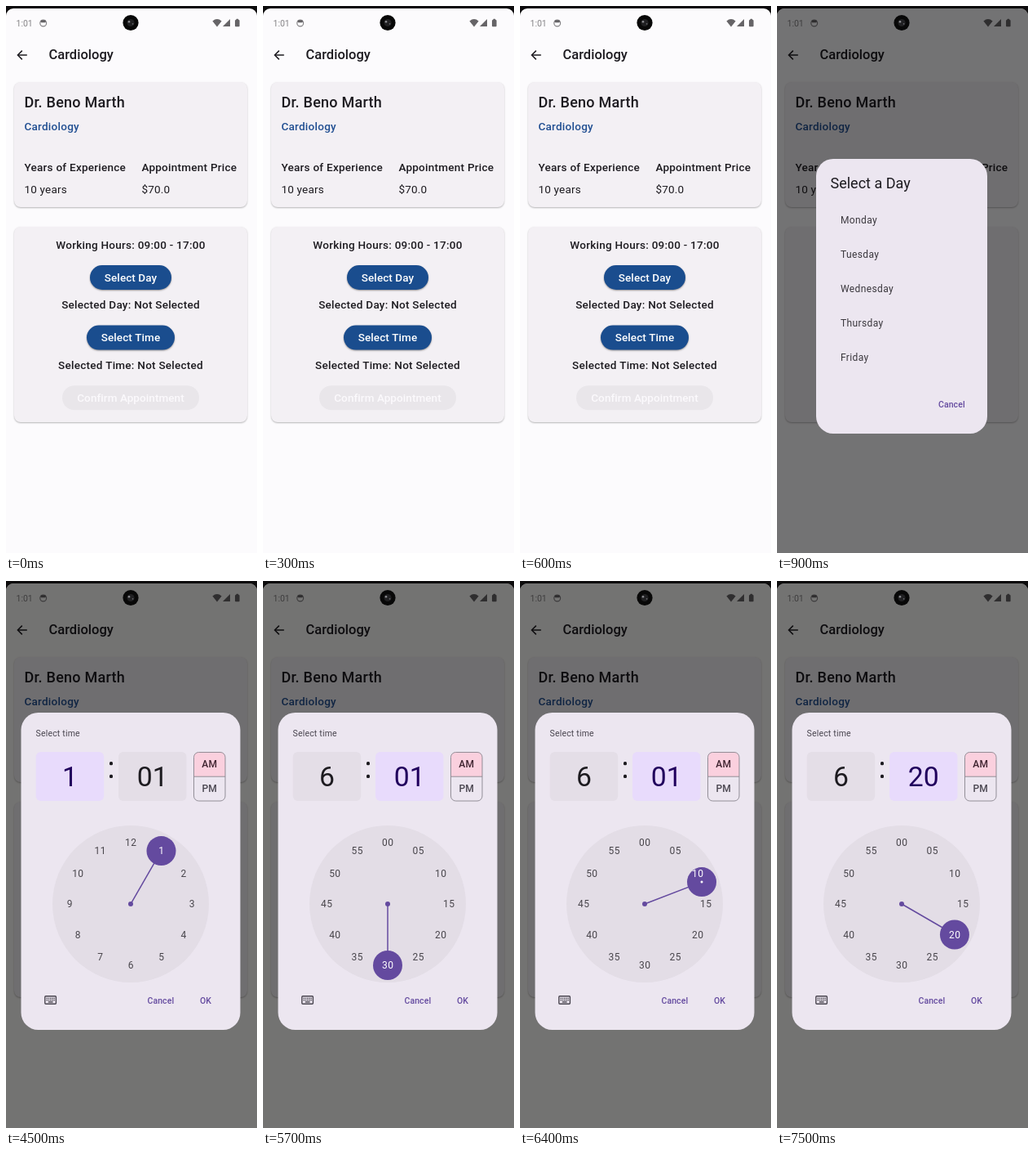
An HTML page with a canvas for the animation above (8 s loop, 308 by 669 pixels).

```html
<!DOCTYPE html>
<html lang="en">
<head>
<meta charset="utf-8">
<title>Appointment booking</title>
<style>
  html, body { margin: 0; width: 100%; height: 100%; overflow: hidden; background: #0d0c0d; }
  canvas { display: block; width: 308px; height: 669px; }
</style>
</head>
<body>
<canvas id="stage"></canvas>
<script>
const W = 308, H = 669, LOOP = 8000;
const canvas = document.getElementById('stage');
const ctx = canvas.getContext('2d');
const ratio = window.devicePixelRatio || 1;
canvas.width = W * ratio;
canvas.height = H * ratio;

const INK = '#1d1b20', SOFT = '#49454f', BLUE = '#1a4d8e', PURPLE = '#644a9f';
const DIALOG = '#ece6f0', FIELD = '#e4dee7', ACTIVE = '#e8dbfc';
const DIAL = { x: 153, y: 395, r: 96, ring: 75, knob: 18 };

function text(str, x, y, size, { color = INK, weight = 400, align = 'left', gap = 0 } = {}) {
  ctx.font = `${weight} ${size}px Roboto, sans-serif`;
  ctx.letterSpacing = gap + 'px';
  ctx.textAlign = align;
  ctx.fillStyle = color;
  ctx.fillText(str, x, y);
}

function box(x, y, w, h, r, color) {
  ctx.beginPath();
  ctx.roundRect(x, y, w, h, r);
  ctx.fillStyle = color;
  ctx.fill();
}

function raised(x, y, w, h, r, color, shade = 0.28) {
  ctx.save();
  ctx.shadowColor = `rgba(0,0,0,${shade})`;
  ctx.shadowBlur = 2 * ratio;
  ctx.shadowOffsetY = ratio;
  box(x, y, w, h, r, color);
  ctx.restore();
}

function disc(x, y, r, color) {
  ctx.beginPath();
  ctx.arc(x, y, r, 0, 2 * Math.PI);
  ctx.fillStyle = color;
  ctx.fill();
}

function line(points, color, width) {
  ctx.beginPath();
  points.forEach(([x, y]) => ctx.lineTo(x, y));
  ctx.strokeStyle = color;
  ctx.lineWidth = width;
  ctx.stroke();
}

function shape(points, color) {
  ctx.beginPath();
  points.forEach(([x, y]) => ctx.lineTo(x, y));
  ctx.fillStyle = color;
  ctx.fill();
}

function statusBar() {
  const grey = '#858386', dark = '#666467';
  text('1:01', 12.5, 25, 10.5, { color: grey });
  ctx.beginPath();
  ctx.arc(45.7, 21, 3.9, 0, 2 * Math.PI);
  ctx.strokeStyle = grey;
  ctx.lineWidth = 1.2;
  ctx.stroke();
  box(42.5, 17.2, 6.4, 3, 1.2, dark);

  ctx.beginPath();
  ctx.moveTo(259, 25.5);
  ctx.lineTo(253.4, 18.4);
  ctx.quadraticCurveTo(259, 13.8, 264.6, 18.4);
  ctx.fillStyle = dark;
  ctx.fill();
  shape([[266, 25], [275, 25], [275, 16]], dark);
  box(281, 17, 5.6, 8.3, 1, dark);
  box(282.5, 15.8, 2.6, 2, 0.4, dark);
}

function camera() {
  disc(153, 20.5, 9.6, '#080808');
  disc(153, 20.5, 4.6, '#202022');
  disc(151, 19.3, 1.3, '#8c8c90');
  disc(155.6, 21.8, 0.9, '#68686c');
}

function button(label, y, w, enabled = true) {
  const x = 153 - w / 2;
  if (enabled) raised(x, y, w, 30, 15, BLUE, 0.4);
  else box(x, y, w, 30, 15, '#e9e6ea');
  text(label, 153, y + 19.6, 13.5,
    { color: enabled ? '#fff' : '#fbf9fc', weight: 500, align: 'center', gap: 0.075 });
}

function bookingPage(day) {
  const bold = { weight: 500, gap: 0.25 };
  const centered = { ...bold, align: 'center' };
  box(0, 3, W, H - 3, [9, 9, 0, 0], day ? '#fcfbf9' : '#fcfbfd');
  statusBar();

  line([[25.8, 60], [14.8, 60]], INK, 1.5);
  line([[19.8, 54.6], [14.4, 60], [19.8, 65.4]], INK, 1.5);
  text('Cardiology', 52.5, 65.2, 16.5, { weight: 500 });

  raised(10, 93, 286, 153, 8, '#f3f0f4');
  text('Dr. Beno Marth', 22.5, 123.6, 18, bold);
  text('Cardiology', 22.5, 152, 13.5, { ...bold, color: '#214f92' });
  text('Years of Experience', 22.5, 202, 13.5, bold);
  text('Appointment Price', 166.5, 202, 13.5, bold);
  text('10 years', 22.5, 228.8, 13.5, { gap: 0.2 });
  text('$70.0', 166.5, 228.8, 13.5, { gap: 0.2 });

  raised(10, 270, 286, 239, 8, '#f3f0f4');
  text('Working Hours: 09:00 - 17:00', 153, 296.6, 13.5, centered);
  button('Select Day', 317, 100);
  text('Selected Day: ' + (day || 'Not Selected'), 153, 370.2, 13.5, centered);
  button('Select Time', 390.6, 108);
  text('Selected Time: Not Selected', 153, 443.8, 13.5, centered);
  button('Confirm Appointment', 464.2, 168, false);
}

function scrim() {
  box(0, 3, W, H - 3, [9, 9, 0, 0], 'rgba(0,0,0,0.54)');
}

function action(label, x, y) {
  text(label, x, y, 10.5, { color: PURPLE, weight: 500, gap: 0.075 });
}

function dayDialog() {
  box(48, 187, 210, 336, 21, DIALOG);
  text('Select a Day', 65.5, 223, 18);
  ['Monday', 'Tuesday', 'Wednesday', 'Thursday', 'Friday'].forEach((name, i) =>
    text(name, 78, 265.7 + i * 42, 12, { color: '#3a373d', gap: 0.375 }));
  action('Cancel', 198, 491.4);
}

function timeField(value, x, active) {
  box(x, 209, 83.5, 60, 6, active ? ACTIVE : FIELD);
  text(value, x + 41.7, 250.6, 33.7, { color: active ? '#21005d' : INK, align: 'center' });
}

function periodToggle() {
  ctx.save();
  ctx.beginPath();
  ctx.roundRect(230.5, 209.5, 38.5, 59.5, 6);
  ctx.clip();
  ctx.fillStyle = '#fad0de';
  ctx.fillRect(230, 209, 40, 30);
  ctx.restore();
  ctx.beginPath();
  ctx.roundRect(230.5, 209.5, 38.5, 59.5, 6);
  ctx.strokeStyle = '#8a858e';
  ctx.lineWidth = 0.9;
  ctx.stroke();
  line([[230.5, 239.2], [269, 239.2]], '#8a858e', 0.9);
  const style = { weight: 500, align: 'center', gap: 0.1 };
  text('AM', 249.7, 228.2, 12, { ...style, color: '#3f2430' });
  text('PM', 249.7, 258.3, 12, { ...style, color: SOFT });
}

function onRing(degrees, radius = DIAL.ring) {
  const a = degrees * Math.PI / 180;
  return [DIAL.x + radius * Math.sin(a), DIAL.y - radius * Math.cos(a)];
}

function dialLabels(minutes, color) {
  for (let i = 0; i < 12; i++) {
    const [x, y] = onRing(i * 30);
    const label = minutes ? String(i * 5).padStart(2, '0') : String(i || 12);
    text(label, x + 0.2, y + 4.3, 12, { color, align: 'center', gap: 0.375 });
  }
}

function dial(minutes, angle) {
  const [x, y] = onRing(angle);
  disc(DIAL.x, DIAL.y, DIAL.r, '#e3dde6');
  dialLabels(minutes, '#49464c');
  line([[DIAL.x, DIAL.y], [x, y]], PURPLE, 1.5);
  disc(DIAL.x, DIAL.y, 3, PURPLE);
  disc(x, y, DIAL.knob, PURPLE);

  // Labels turn white only where the knob covers them.
  ctx.save();
  ctx.beginPath();
  ctx.arc(x, y, DIAL.knob, 0, 2 * Math.PI);
  ctx.clip();
  dialLabels(minutes, '#fff');
  ctx.restore();
  const offset = angle % 30;
  if (offset > 5.7 && offset < 25.8) disc(x, y, 1.5, '#fff');
}

function keyboardIcon() {
  const color = '#49454f';
  ctx.beginPath();
  ctx.roundRect(47.8, 507.8, 13.6, 9.4, 1);
  ctx.strokeStyle = color;
  ctx.lineWidth = 1.4;
  ctx.stroke();
  ctx.fillStyle = color;
  for (let row = 0; row < 2; row++)
    for (let col = 0; col < 5; col++)
      ctx.fillRect(49.6 + col * 2.2, 509.7 + row * 2.2, 1.4, 1.4);
  ctx.fillRect(51.8, 514.2, 5.8, 1.4);
}

function timeDialog(hour, minute, minutes, angle) {
  box(18.5, 161, 269, 388, 21, DIALOG);
  text('Select time', 36.5, 190.2, 10.5, { color: SOFT, gap: 0.19 });
  timeField(hour, 36.7, !minutes);
  timeField(minute, 138, minutes);
  box(127, 221, 4, 4.2, 1.5, INK);
  box(127, 236.8, 4, 4.2, 1.5, INK);
  periodToggle();
  dial(minutes, angle);
  keyboardIcon();
  action('Cancel', 173.5, 516.6);
  action('OK', 238, 516.6);
}

// The hand swings from the chosen hour to the current minute in coarse steps.
function minuteAngle(t) {
  if (t < 6300) return 180;
  if (t < 6400) return 90;
  if (t < 6600) return 69;
  return t < 7500 ? 6 : 120;
}

function draw(t) {
  ctx.setTransform(ratio, 0, 0, ratio, 0, 0);
  ctx.fillStyle = '#0d0c0d';
  ctx.fillRect(0, 0, W, H);
  bookingPage(t < 2800 ? '' : 'Wednesday');

  const choosingDay = t >= 900 && t < 2800;
  const choosingTime = t >= 4500;
  if (choosingDay || choosingTime) scrim();
  camera();
  if (choosingDay) dayDialog();
  if (choosingTime) {
    if (t < 5700) timeDialog('1', '01', false, 30);
    else timeDialog('6', t < 7500 ? '01' : '20', true, minuteAngle(t));
  }
}

const start = performance.now();
function tick() {
  draw((performance.now() - start) % LOOP);
  requestAnimationFrame(tick);
}
tick();
</script>
</body>
</html>
```
